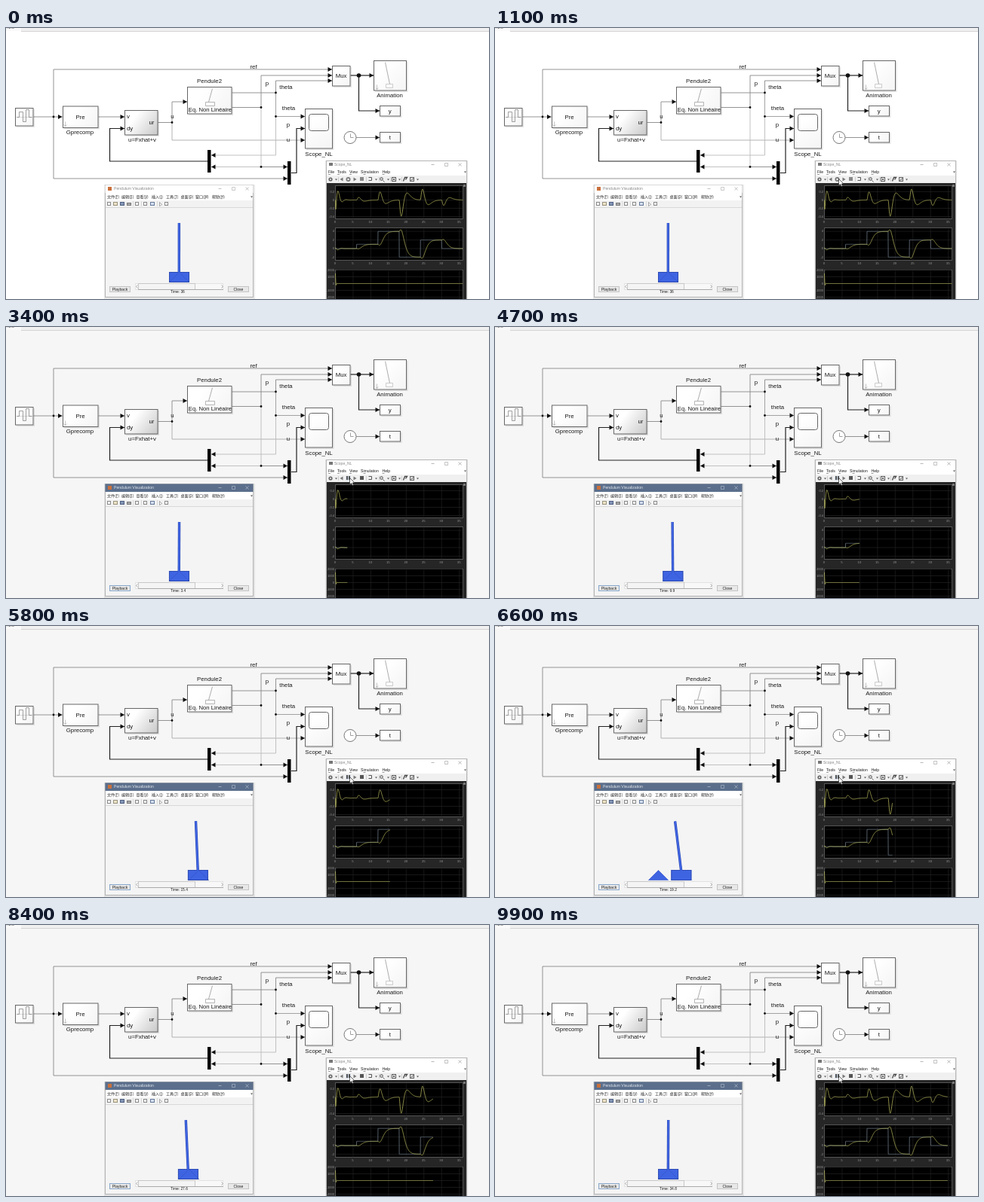
An HTML page with a canvas for the animation above (10000 ms loop, 640x360 px).

```html
<!DOCTYPE html>
<html lang="en">
<head>
<meta charset="utf-8">
<title>Inverted pendulum simulation</title>
<style>
html, body { margin: 0; width: 100%; height: 100%; overflow: hidden; background: #fff; }
canvas { display: block; }
</style>
</head>
<body>
<canvas id="stage" width="640" height="360"></canvas>
<script>
const g = document.getElementById('stage').getContext('2d');
const SANS = '"Liberation Sans", Arial, sans-serif';
const CJK = '"Noto Sans CJK SC", "Noto Sans CJK", sans-serif';
const LOOP = 10000, RUN = 1500, START = 2700;

// ---------- drawing helpers ----------
function path(pts, color = '#111', w = 1, fill, shift = .5) {
  g.beginPath();
  for (let i = 0; i < pts.length; i += 2) g.lineTo(pts[i] + shift, pts[i + 1] + shift);
  if (fill) { g.closePath(); g.fillStyle = fill; g.fill(); }
  if (color) { g.strokeStyle = color; g.lineWidth = w; g.stroke(); }
}
function rect(x, y, w, h, fill, stroke) {
  if (fill) { g.fillStyle = fill; g.fillRect(x, y, w, h); }
  if (stroke) { g.strokeStyle = stroke; g.lineWidth = 1; g.strokeRect(x + .5, y + .5, w - 1, h - 1); }
}
function text(s, x, y, size = 7.8, align = 'center', color = '#1a1a1a', font = SANS) {
  g.font = size + 'px ' + font;
  g.textAlign = align;
  g.textBaseline = 'middle';
  g.fillStyle = color;
  g.fillText(s, x, y);
}
function dot(x, y, r = 1.4, color = '#111') {
  g.fillStyle = color;
  g.beginPath();
  g.arc(x, y, r, 0, 7);
  g.fill();
}
function wire(pts, color = '#888', w = .9, dir = 1) {
  path(pts, color, w, null, 0);
  const [x, y] = pts.slice(-2);
  path([x, y, x - 5.5 * dir, y - 3, x - 5.5 * dir, y + 3], null, 0, '#111', 0);
}
function block(x, y, w, h, label, tint = '#f4f4f4') {
  rect(x + 2, y + 2, w, h, 'rgba(0,0,0,.1)');
  const shade = g.createLinearGradient(x, y, x + w, y + h);
  shade.addColorStop(.3, '#fff');
  shade.addColorStop(1, tint);
  rect(x, y, w + .5, h + .5, shade, '#666');
  if (label) text(label, x + w / 2, y + h / 2 + .5);
}
function caret(x, y) { path([x - 1.5, y - 1, x + 1.5, y - 1, x, y + 1], null, 0, '#555'); }
function downArrow(x, y) {
  path([x, y - 3, x, y + 3], '#aaa', .7);
  path([x - 2, y + 1, x, y + 3, x + 2, y + 1], '#aaa', .7);
}
function windowButtons(x, gap, y, color) {
  path([x - 2, y, x + 2, y], color, .6);
  path([x + gap - 2, y - 2, x + gap + 2, y - 2, x + gap + 2, y + 2, x + gap - 2, y + 2, x + gap - 2, y - 2], color, .5);
  const c = x + 2 * gap;
  path([c - 2, y - 2, c + 2, y + 2], color, .6);
  path([c - 2, y + 2, c + 2, y - 2], color, .6);
}

// ---------- simulation ----------
const levels = [0, 1, 4, -2, 2, 0];
const ref = t => levels[Math.min(5, Math.floor(t / 6))];
function respond(t, shape) {
  let sum = 0;
  for (let k = 1; k < 6 && t > 6 * k; k++) sum += (levels[k] - levels[k - 1]) * shape(t - 6 * k);
  return sum;
}
// Damped start-up swing that leaves from rest
const ring = (t, amp, phase) => amp * (1 - Math.exp(-15 * t)) * Math.exp(-1.4 * t) * Math.sin(2.7 * t - phase);
const pos = t => ring(t, -.8, .6) + respond(t, s => {
  const x = 2 * s;
  return 1 - (1 + x + .9 * x * x) * Math.exp(-x);
});
const theta = t => ring(t, .65, .8) + respond(t, s => {
  const x = 2.1 * s;
  return .249 * x * x * (1 - x / 3) * Math.exp(-x);
});
const force = t => 1500 * Math.exp(-9 * t) * Math.cos(14 * t);

const knots = [[2700, 0], [3400, 3.4], [5800, 15.4], [7400, 23], [8400, 27.6], [9900, 34.8]];
function simTime(ms) {
  if (ms < RUN) return 36;
  if (ms < START) return 0;
  let i = 1;
  while (i < knots.length - 1 && ms > knots[i][0]) i++;
  const [a, b] = [knots[i - 1], knots[i]];
  return a[1] + (ms - a[0]) / (b[0] - a[0]) * (b[1] - a[1]);
}

// ---------- block diagram ----------
function drawDiagram(running) {
  rect(0, 0, 640, 360, running ? '#f6f6f6' : '#fff');
  rect(0, 0, 640, 4, '#f0f0f0');
  rect(20, 4, 620, 1, '#d4d4d4');
  rect(0, 0, 20, 4, '#fafafa');
  text('..2.3', 1, 0, 5, 'left', '#555');

  wire([36, 118, 74.5, 118]);
  wire([63, 118, 63, 55, 432, 55]);
  wire([63, 118, 63, 200, 373, 200]);
  wire([122, 118, 157, 118]);
  wire([201, 125.5, 220, 125.5, 220, 98, 240, 98]);
  wire([220, 125.5, 220, 149, 396, 149], '#aaa');
  wire([299, 86, 357.5, 86, 357.5, 70, 432, 70]);
  wire([357.5, 86, 357.5, 117.5, 396, 117.5], '#999');
  wire([357.5, 117.5, 357.5, 169, 272, 169], '#bbb', .9, -1);
  wire([299, 105.5, 338, 105.5, 338, 63, 432, 63]);
  wire([338, 105.5, 338, 184.5, 272, 184.5], '#bbb', .9, -1);
  wire([338, 184.5, 373, 184.5]);
  wire([267, 177, 137.5, 177, 137.5, 133.5, 157, 133.5], '#222', 1.2);
  wire([378, 192.5, 385, 192.5, 385, 133.5, 396, 133.5], '#222', 1.2);
  wire([456, 63, 487, 63], '#222', 1.2);
  wire([467.5, 63, 467.5, 110, 495, 110], '#222', 1.2);
  wire([464, 145.5, 495, 145.5]);
  for (const [x, y] of [[63, 118], [220, 125.5], [357.5, 86], [357.5, 117.5], [338, 105.5], [338, 184.5]]) dot(x, y);
  dot(467.5, 63, 2.8);

  block(12, 106, 24, 24);
  path([13, 118, 34, 118], '#ccc', .7);
  path([14, 118, 17, 118, 17, 111, 22, 111, 22, 124, 26, 124, 26, 108, 30, 108, 30, 118, 34, 118], '#777', .7);
  block(75, 103.5, 47, 29, 'Pre');
  downArrow(78, 127);
  block(157, 109, 44, 33, '', '#c8c8c8');
  text('v', 162, 118);
  text('dy', 164, 133.5);
  text('ur', 193, 125.5);
  block(240, 78, 59, 36);
  path([273, 80, 268, 98], '#999', .8);
  path([264, 98, 276, 98, 276, 103, 264, 103, 264, 98], '#999', .7);
  text('Eq. Non Linéaire', 270.5, 108.5, 7.7);
  downArrow(243, 109);
  rect(267, 162, 4.5, 30, '#000');
  rect(373, 177, 4.5, 31, '#000');
  block(396, 107, 36.5, 53);
  g.strokeStyle = '#666';
  g.lineWidth = 1;
  g.beginPath();
  g.roundRect(401.5, 114.5, 26, 22, 3);
  g.stroke();
  block(432, 50, 24, 27, 'Mux');
  block(487, 43, 43.5, 40);
  path([502, 45, 508, 74], '#999', .8);
  path([503, 74, 512, 74, 512, 79, 503, 79, 503, 74], '#bbb', .7);
  downArrow(491, 78);
  block(495, 103, 27.5, 14, 'y');
  block(495, 138, 27.5, 14, 't');
  g.fillStyle = '#fff';
  g.strokeStyle = '#777';
  g.beginPath();
  g.arc(456, 145.5, 8, 0, 7);
  g.fill();
  g.stroke();
  path([456, 140, 456, 145, 460, 145], '#888', .8);

  const labels = [['ref', 328, 51.5], ['Pendule2', 269.5, 70.5], ['p', 346, 73.5], ['theta', 371, 79], ['theta', 374.5, 106.5],
    ['p', 374, 128.5], ['u', 374, 148.5], ['u', 220.5, 117.5], ['Gprecomp', 98, 139], ['u=Fxhat+v', 180.5, 149],
    ['Scope_NL', 414.5, 167.5], ['Animation', 508.5, 89.5]];
  for (const l of labels) text(...l);
}

// ---------- pendulum window ----------
function drawPendulum(t, running, target) {
  const ink = running ? '#e4e8ee' : '#888';
  rect(130, 208, 200, 152, 'rgba(0,0,0,.08)');
  rect(131, 208, 197, 150, '#f4f4f4', '#b4b4b4');
  rect(131.5, 208.5, 196, 10.5, running ? '#5b6f8c' : '#fff');
  rect(135, 211, 5, 5, '#c9703c');
  text('Pendulum Visualization', 143, 214, 5.1, 'left', ink);
  windowButtons(283, 18, 213, running ? '#c4ccd8' : '#999');

  rect(132, 219, 195, 10, '#fff');
  const menu = [['文件(F)', 134], ['编辑(E)', 153], ['查看(V)', 172.5], ['插入(I)', 193], ['工具(T)', 212], ['桌面(D)', 231.5],
    ['窗口(W)', 251], ['帮助(H)', 273]];
  for (const [s, x] of menu) {
    text(s, x, 224, 5, 'left', '#222', CJK);
    rect(x + 11.3, 226.6, 2.6, .5, '#333');
  }
  caret(325, 224);
  rect(132, 229, 195, 9, '#f2f2f2');
  rect(132, 238, 195, 1, '#d8d8d8');
  for (const x of [134, 171, 182, 210]) rect(x, 231, 5, 5, '#fff', '#888');
  rect(142, 231, 6, 5, '#ece3c8', '#99927c');
  rect(151, 231, 6, 5, '#8496b8', '#4e5f80');
  rect(160, 232, 6, 4, '#aaa', '#777');
  rect(191, 231, 6, 5, '#d5dfee', '#667a9b');
  path([203, 231, 203, 236, 206, 234], '#555', .5, '#fff');
  for (const x of [168, 179, 200]) rect(x, 230, 1, 7, '#d8d8d8');

  const x = 229 + 6.5 * pos(t), m = 229 + 6.5 * target;
  const marker = [m - 13, 337, m, 324, m + 13, 337];
  const blue = '#3f64e2', edge = '#2f4db4';
  path(marker, blue, .5, blue);
  rect(x - 13, 324, 27, 14, blue, edge);
  path([...marker, m - 13, 337], 'rgba(25,50,140,.3)', .7);
  g.strokeStyle = edge;
  g.lineWidth = 3.4;
  g.beginPath();
  g.moveTo(x + .3, 325);
  const a = theta(t);
  g.lineTo(x + .3 + 66 * Math.sin(a), 325 - 66 * Math.cos(a));
  g.stroke();
  g.strokeStyle = blue;
  g.lineWidth = 2.2;
  g.stroke();

  rect(171, 339, 117, 9, '#f8f8f8', '#e2e2e2');
  rect(175, 339, 76, 9, '#f4f4f4', '#c8c8c8');
  rect(175, 347, 113, 1, '#aaa');
  path([174, 341, 172, 343, 174, 345], '#777', .6);
  path([285, 341, 287, 343, 285, 345], '#777', .6);
  rect(137, 343, 28, 8, '#e8e8e8', running ? '#88a8cc' : '#c4c4c4');
  text('Playback', 151, 347.3, 5);
  rect(294, 343, 28, 8, '#e8e8e8', '#c4c4c4');
  text('Close', 308, 347.3, 5);
  text('Time: ' + +t.toFixed(1), 218, 350.5, 4.9, 'left');
}

// ---------- scope window ----------
const AX = 436, PX = 4.69;
function axes(y, h, zero, scale, ticks) {
  rect(AX, y, 170, h, '#000', '#555');
  for (let s = 0; s <= 35; s += 5) {
    const x = AX + s * PX;
    if (s) path([x, y + 1, x, y + h - 1], '#222', .7);
    text(s, x, y + h + 4, 4.2, 'center', '#999');
  }
  for (const v of ticks) {
    path([AX + 1, zero - v * scale, 604, zero - v * scale], '#222', .7);
    text(v, AX - 1, zero - v * scale + .5, 4, 'right', '#999');
  }
}
function curve(f, zero, scale, end, color = '#bcbc60') {
  g.beginPath();
  for (let t = 0; t <= end; t += .04) g.lineTo(AX + .5 + t * PX, zero + .5 - f(t) * scale);
  g.strokeStyle = color;
  g.lineWidth = .75;
  g.stroke();
}
function drawScope(end, running, simulating) {
  rect(423, 176, 189, 184, 'rgba(0,0,0,.08)');
  rect(424, 176, 187, 190, '#fff', '#b4b4b4');
  rect(428, 179, 5, 4, '#777');
  text('Scope_NL', 435, 181.5, 5, 'left', '#888');
  windowButtons(565, 18, 181, '#888');
  const menu = [['File', 427], ['Tools', 439], ['View', 455], ['Simulation', 470], ['Help', 498.5]];
  for (const [s, x] of menu) {
    text(s, x, 191.5, 5.1, 'left');
    rect(x + (s === 'Simulation' ? 3.5 : 0), 194, 3, .5, '#333');
  }
  caret(608, 191);
  rect(425, 196, 185, 10, '#f0f0f0');
  for (const x of [437, 490, 506, 521, 545]) caret(x, 201);
  for (const x of [440, 477, 494, 509, 524]) rect(x, 198, 1, 6, '#ccc');
  dot(430, 201, 2.6, '#666');
  dot(430, 201, 1, '#f0f0f0');
  path([446, 198, 446, 203, 442, 200.5], null, 0, '#777');
  if (simulating) {
    rect(450, 198, 7, 6, '#d5dfeb');
    rect(451, 198, 2, 5, '#555');
    rect(454, 198, 2, 5, '#555');
  } else {
    dot(453.5, 201, 3, running ? '#555' : '#777');
    path([452, 199, 452, 202, 455, 200.5], null, 0, '#fff');
  }
  path([460, 198, 460, 203, 464, 200.5], null, 0, '#777');
  rect(469, 198, 5, 5, running ? '#555' : '#888');
  path([480, 198, 484, 198, 484, 202, 480, 202], '#555', 1);
  dot(497.5, 200.5, 2.2, '#555');
  dot(497.5, 200.5, 1.2, '#f0f0f0');
  path([499, 202, 501, 204], '#555', 1);
  rect(511, 198, 6, 6, '#fff', '#555');
  dot(514, 201, 1.2, '#555');
  path([526, 203, 528, 198, 531, 198, 529, 201], '#444', 1.3);
  rect(535, 198, 6, 6, '#ddd', '#666');
  path([536, 202, 540, 199], '#444', .8);

  rect(425, 206, 185, 154, '#262626');
  rect(606, 208, 3, 3, '#777');
  axes(209, 45, 228, 55, [.2, 0, -.2, -.4]);
  axes(265, 44, 292.5, 5.7, [4, 2, 0, -2]);
  axes(321, 44, 339, .009, [2000, 1000, 0, -1000, -2000]);
  curve(theta, 228, 55, end);
  curve(ref, 292.5, 5.7, end, '#707e8a');
  curve(pos, 292.5, 5.7, end);
  curve(force, 339, .009, end);
}

function drawCursor(ms) {
  const k = Math.min(1, (ms - 500) / 600);
  if (k < 0) return;
  const rest = (1 - k) ** 2, x = 455 + 30 * rest, y = 200 + 160 * rest;
  path([x, y, x, y + 9, x + 2, y + 7, x + 3.5, y + 10, x + 5, y + 9.3, x + 3.6, y + 6.5, x + 6.3, y + 6.3, x, y], '#222', .7, '#fff');
}

function frame(now) {
  const ms = Math.floor(now % LOOP / 100) * 100;
  const running = ms >= RUN, simulating = ms >= START, t = simTime(ms);
  drawDiagram(running);
  drawPendulum(t, running, running && !simulating ? 3.2 : ref(t));
  drawScope(simulating ? t : 36, running, simulating);
  drawCursor(ms);
  requestAnimationFrame(frame);
}
requestAnimationFrame(frame);
</script>
</body>
</html>
```
